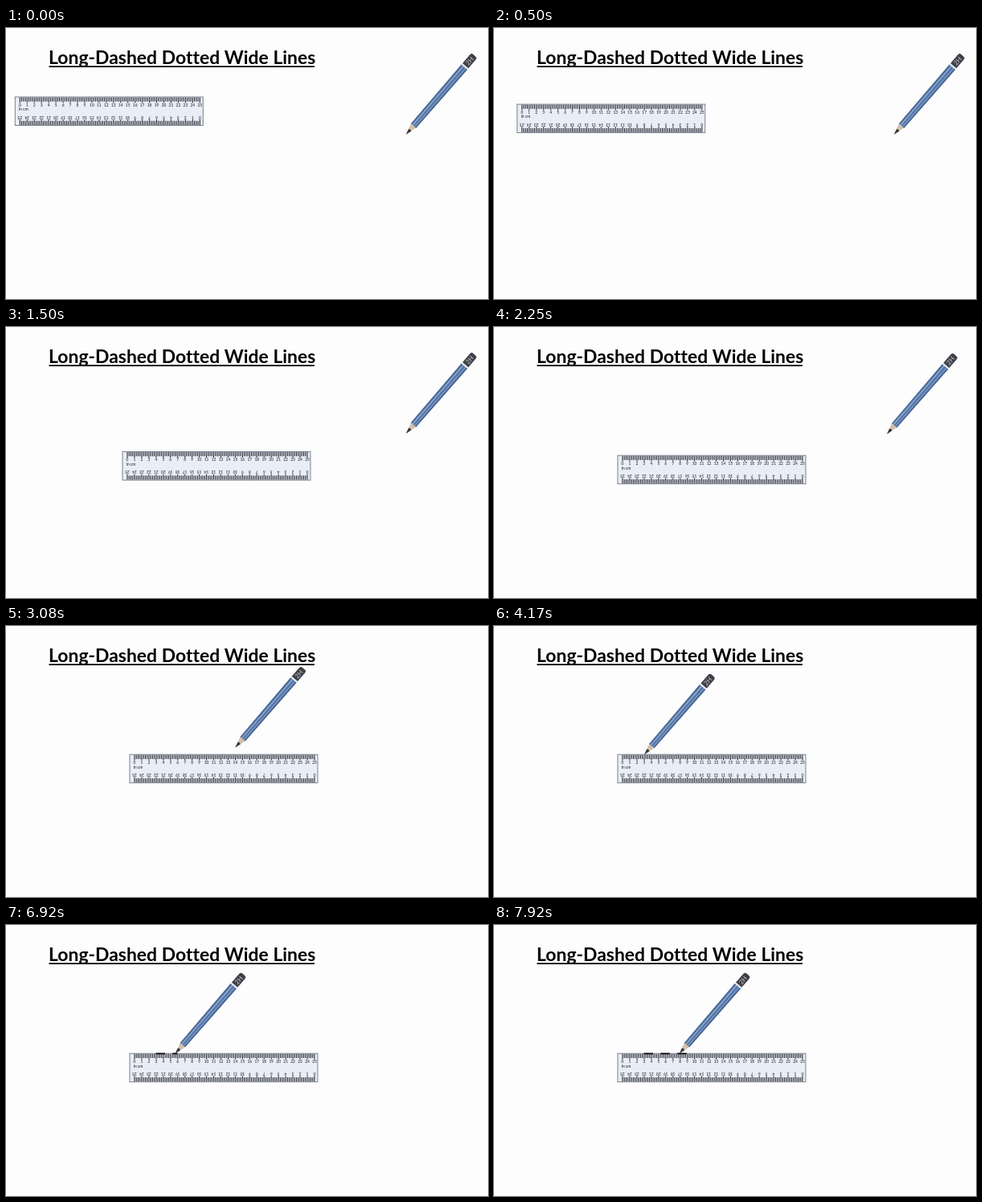
These frames come from a looping animation (600 px wide and 338 px high, 8 s). An HTML page with a canvas:

```html
<!DOCTYPE html>
<html lang="en">
<head>
<meta charset="utf-8">
<title>Long-Dashed Dotted Wide Lines</title>
<style>
html, body { margin: 0; width: 100%; height: 100%; overflow: hidden; background: #fdfdfe; }
canvas { display: block; width: 600px; height: 338px; }
</style>
</head>
<body>
<canvas id="stage"></canvas>
<script>
const LOOP = 8000;
const canvas = document.getElementById('stage');
const ctx = canvas.getContext('2d');
const ratio = window.devicePixelRatio || 1;
canvas.width = 600 * ratio;
canvas.height = 338 * ratio;

const RULER = { w: 234, h: 35.5, inset: 6, cm: 8.96, count: 25 };
const PENCIL = { len: 130.5, cap: 113.5, half: 4.8, angle: Math.atan2(-98.5, 85) };

// pencil tip offset along the ruler edge: [time, px]
const DRAW_KEYS = [[4250, 0], [5000, 1.9], [5830, 9.3], [6670, 18.5], [7500, 35.3], [8000, 45.3]];

// dashes along the ruler edge
const DASHES = [
  { x: 186.5, from: 4900, to: 5900 },
  { x: 207.3, from: 6550, to: 7250 },
  { x: 228.2, from: 7400, to: 7920 }
];
const DASH_LEN = 11.5;

const clamp = v => Math.max(0, Math.min(1, v));
const span = (t, from, to) => clamp((t - from) / (to - from));
const easeInOut = u => u < 0.5 ? 2 * u * u : 1 - 2 * (1 - u) ** 2;
const mix = (a, b, p) => a + (b - a) * p;

function keyed(t, keys) {
  let value = keys[0][1];
  for (let i = 1; i < keys.length; i++) {
    const [t0, v0] = keys[i - 1], [t1, v1] = keys[i];
    if (t >= t0) value = mix(v0, v1, span(t, t0, t1));
  }
  return value;
}

function poly(points, fill) {
  ctx.beginPath();
  points.forEach(([x, y]) => ctx.lineTo(x, y));
  ctx.closePath();
  ctx.fillStyle = fill;
  ctx.fill();
}

function drawTitle() {
  ctx.save();
  ctx.fillStyle = '#000';
  ctx.textAlign = 'left';
  ctx.textBaseline = 'alphabetic';
  ctx.font = 'bold 22.9px Lato, sans-serif';
  ctx.letterSpacing = '0.02px'; // any spacing turns ligatures off
  ctx.fillText('Long-Dashed Dotted Wide Lines', 53, 45);
  ctx.restore();
  ctx.fillStyle = '#000';
  ctx.fillRect(53.5, 47.2, 330.5, 1.8);
}

function drawScale() {
  const { inset, cm, count } = RULER;
  ctx.fillStyle = '#15151a';
  for (let i = 0; i <= count * 4; i++) {
    const major = i % 4 === 0;
    ctx.fillRect(inset + i * cm / 4 - 0.5, 0.5, 1, major ? 6.8 : 5.2);
  }
  ctx.font = '4.9px Lato, sans-serif';
  ctx.textAlign = 'center';
  ctx.textBaseline = 'alphabetic';
  for (let i = 0; i <= count; i++) ctx.fillText(i, inset + i * cm, 11.6);
}

function drawRuler(x, y) {
  const { w, h, inset, cm, count } = RULER;
  ctx.save();
  ctx.translate(x, y);
  ctx.fillStyle = '#e9edf6';
  ctx.fillRect(0, 0, w, h);
  drawScale();
  ctx.textAlign = 'left';
  ctx.fillText('In cm', 4.7, 17.3);
  // the lower scale runs backwards over the same span
  ctx.save();
  ctx.translate(2 * inset + count * cm, h);
  ctx.rotate(Math.PI);
  drawScale();
  ctx.restore();
  ctx.strokeStyle = '#6b7585';
  ctx.lineWidth = 0.9;
  ctx.strokeRect(0, 0, w, h);
  ctx.restore();
}

// lengthwise band between two fractions of the half width
function bodyBand(from, to, fill) {
  const { cap, half } = PENCIL;
  const near = 4.1, start = 14.5, end = cap - 2;
  poly([[start, near * from], [end, half * from], [end, half * to], [start, near * to]], fill);
}

function drawPencil(x, y) {
  const { len, cap, half, angle } = PENCIL;
  ctx.save();
  ctx.translate(x, y);
  ctx.rotate(angle);
  poly([[7, -2], [15, -4.1], [15, 4.1], [7, 2]], '#d3c1a8');
  poly([[0, 0], [7.5, -2.1], [8.5, 0], [7.5, 2.1]], '#36363b');
  bodyBand(-1, 1, '#5578a9');
  bodyBand(-1, -0.76, '#48658f');
  bodyBand(0.74, 1, '#455f88');
  bodyBand(-0.46, -0.24, '#a9bdd8');
  bodyBand(0.34, 0.52, '#8fa8cb');
  poly([[cap - 2, -half], [cap, -half], [cap, half], [cap - 2, half]], '#e8ebf0');
  ctx.fillStyle = '#3f4047';
  ctx.beginPath();
  ctx.roundRect(cap, -half, len - cap, half * 2, [0, 3, 3, 0]);
  ctx.fill();
  ctx.fillStyle = '#c9cbd1';
  ctx.font = '8px Lato, sans-serif';
  ctx.textAlign = 'center';
  ctx.textBaseline = 'middle';
  ctx.fillText('2H', cap + 7.8, 0.4);
  ctx.restore();
}

function drawDashes(t) {
  ctx.fillStyle = '#000';
  for (const { x, from, to } of DASHES) {
    ctx.fillRect(x, 159.6, DASH_LEN * span(t, from, to), 1.6);
  }
}

function render(t) {
  ctx.setTransform(ratio, 0, 0, ratio, 0, 0);
  ctx.fillStyle = '#fdfdfe';
  ctx.fillRect(0, 0, 600, 338);
  drawTitle();
  const slide = easeInOut(span(t, 70, 1810));
  drawRuler(mix(11.3, 154, slide), mix(86, 160.2, slide));
  drawDashes(t);
  const approach = easeInOut(span(t, 2045, 3765));
  drawPencil(mix(497.8, 186.9, approach) + keyed(t, DRAW_KEYS), mix(133, 160.6, approach));
}

function frame() {
  render(performance.now() % LOOP);
  requestAnimationFrame(frame);
}
frame();
</script>
</body>
</html>
```
